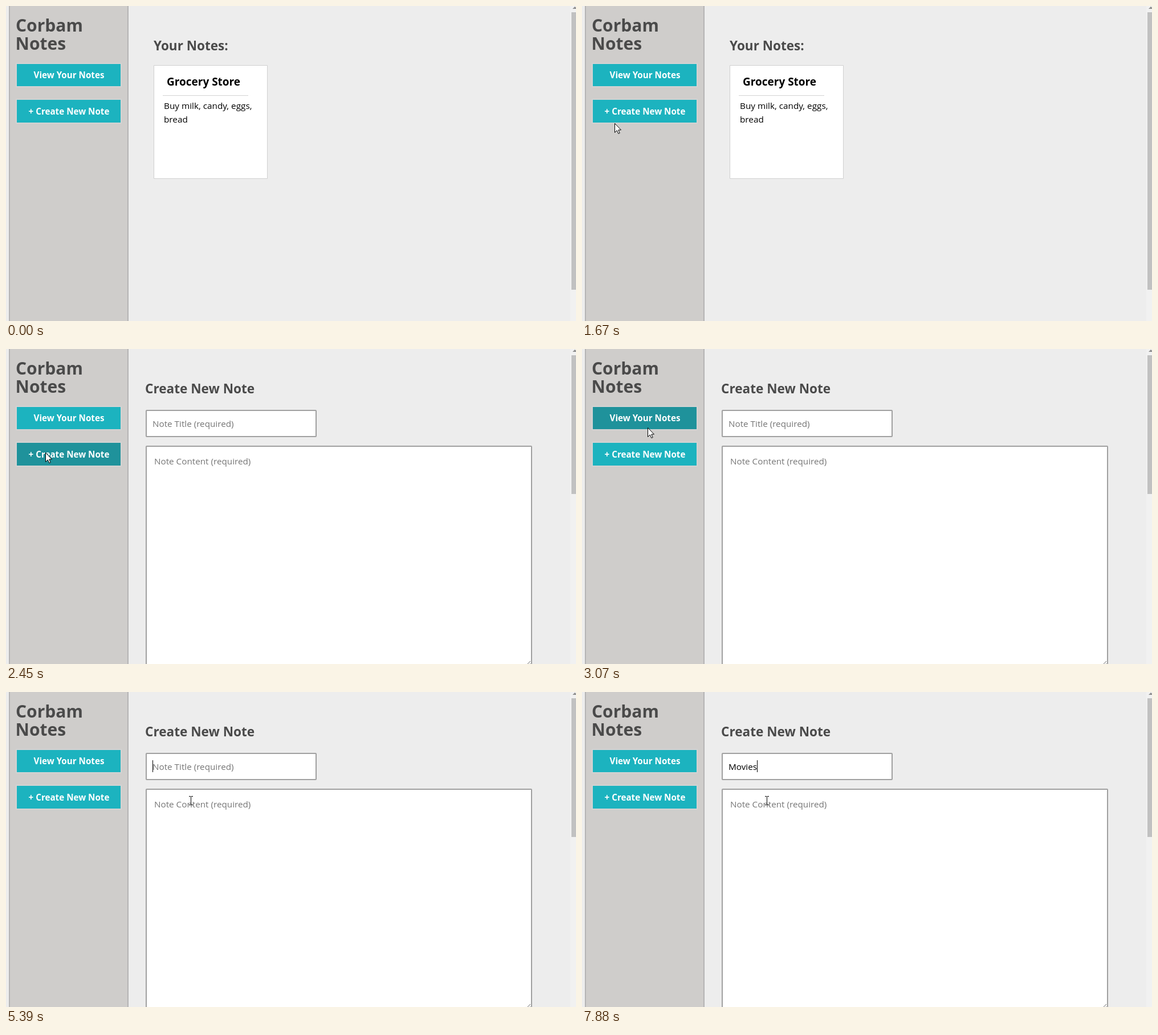
Animation, 1000 px wide and 554 px high, one loop 8000 ms. Source, as an HTML page with a canvas:

```html
<!DOCTYPE html>
<html lang="en">
<head>
<meta charset="utf-8">
<title>Notes app</title>
<style>
  html, body { margin: 0; width: 100%; height: 100%; overflow: hidden; background: #ededed; }
  canvas { display: block; }
</style>
</head>
<body>
<canvas id="stage" width="1000" height="554"></canvas>
<script>
const ctx = document.getElementById('stage').getContext('2d');
const LOOP = 8000;
const TEAL = '#1cb3bf', TEAL_DARK = '#1f929b', INK = '#4a4a4a', HINT = '#757575';

// [start ms, x, y] of the pointer
const POINTER = [
  [580, 755, 540], [735, 591, 475], [890, 444, 416], [1045, 314, 364],
  [1200, 202, 319], [1355, 119, 286], [1510, 72, 267],
  [1670, 57, 206], [1815, 63, 191], [1960, 69, 182],
  [2910, 82, 168], [3065, 115, 138], [3220, 174, 122], [3375, 238, 117], [3530, 300, 120],
  [4480, 314, 158], [4630, 322, 190]
];
const TYPING = [[6970, 'M'], [7110, 'Mo'], [7250, 'Mov'], [7580, 'Movie'], [7880, 'Movies']];
const CLICKS = [[2300, 2450], [3850, 4020]];
const CARET = [[3850, 4480], [5390, 5860], [6480, LOOP]];

const latest = (list, t) => list.filter(item => item[0] <= t).pop();
const during = (spans, t) => spans.some(([from, to]) => t >= from && t < to);

function rect(x, y, w, h, color) {
  ctx.fillStyle = color;
  ctx.fillRect(x, y, w, h);
}

function text(str, x, y, size, color, weight = 400, align = 'left') {
  ctx.font = `${weight} ${size}px "Open Sans", "Noto Sans", sans-serif`;
  ctx.textAlign = align;
  ctx.fillStyle = color;
  ctx.fillText(str, x, y);
}

function box(x, y, w, h, line, color, radius = 0, fill = '#fff') {
  ctx.beginPath();
  ctx.roundRect(x + line / 2, y + line / 2, w - line, h - line, radius);
  if (fill) {
    ctx.fillStyle = fill;
    ctx.fill();
  }
  ctx.lineWidth = line;
  ctx.strokeStyle = color;
  ctx.stroke();
}

function button(label, y, h, pointer) {
  const hover = pointer && pointer[1] >= 17 && pointer[1] < 203
    && pointer[2] >= y && pointer[2] < y + h - 2;
  rect(17, y, 186, h, '#d3d3d3');
  rect(19, y + 2, 182, h - 4, hover ? TEAL_DARK : TEAL);
  text(label, 110.5, y + h - 16, 15.2, '#fff', 700, 'center');
}

function sidebar(t, pointer) {
  rect(5, 0, 210, 554, '#b5b4b4');
  rect(7, 0, 206, 554, '#cfcdcb');
  text('Corbam', 17, 45, 30, INK, 700);
  text('Notes', 16.5, 77, 30, INK, 700);
  button('View Your Notes', 100, 43, pointer);
  button('+ Create New Note', 163, 44, pointer);
  if (t >= 2300 && t < 2450) box(16, 162, 188, 46, 1.5, '#85a9e6', 1, null);
}

function scrollbar(thumbHeight) {
  rect(990, 0, 10, 554, '#f1f1f1');
  rect(992, 11, 8, thumbHeight, '#c1c1c1');
  ctx.fillStyle = '#8b8b8b';
  ctx.fill(new Path2D('M994 5 L998 1 L1000 3 V5 Z'));
}

function notesPage() {
  text('Your Notes:', 259, 78, 22.5, INK, 700);
  box(259, 104, 200, 200, 1, '#d0d0d0');
  text('Grocery Store', 282, 140, 19, '#000', 700);
  rect(275, 157, 150, 1, '#d3d3d3');
  text('Buy milk, candy, eggs,', 277, 181, 15.3, '#000');
  text('bread', 277, 205, 15.3, '#000');
  scrollbar(488);
}

function formPage(t) {
  const typed = latest(TYPING, t)?.[1] ?? '';
  text('Create New Note', 244, 78, 22.6, INK, 700);
  box(245, 107, 300, 48, 2, '#a0a0a0', 1);
  text(typed || 'Note Title (required)', 257, 137, 15.25, typed ? '#000' : HINT);
  const caretX = 257 + (typed ? Math.round(ctx.measureText(typed).width) : 0);
  if (during(CARET, t)) rect(caretX, 120, 1, 21, '#000');
  box(245, 170, 678, 400, 2, '#a0a0a0', 1);
  text('Note Content (required)', 260, 203, 15.25, HINT);
  ctx.lineWidth = 1;
  ctx.strokeStyle = '#666';
  ctx.stroke(new Path2D('M914 555 L920 549 M918 555 L920 553'));
  scrollbar(244);
}

function drawPointer(t, [, x, y]) {
  ctx.save();
  ctx.translate(x, y);
  ctx.lineWidth = 1;
  ctx.strokeStyle = '#000';
  if (t < 3530) {
    const arrow = new Path2D('M.5 .5 V16.5 L4.3 12.9 L6.8 18.5 L9.2 17.5 L6.8 12 H11.5 Z');
    ctx.fillStyle = '#fff';
    ctx.fill(arrow);
    ctx.stroke(arrow);
  } else {
    ctx.stroke(new Path2D('M2.5 -6 V8 M-1 -6.5 H2 M3 -6.5 H6 M-1 8.5 H2 M3 8.5 H6'));
  }
  if (during(CLICKS, t)) {
    ctx.beginPath();
    ctx.arc(0, 0, 12, 0, Math.PI * 2);
    ctx.fillStyle = 'rgba(255, 255, 0, .5)';
    ctx.fill();
  }
  ctx.restore();
}

function draw(now) {
  const t = now % LOOP;
  const pointer = latest(POINTER, t);
  rect(0, 0, 1000, 554, '#ededed');
  sidebar(t, pointer);
  if (t < 2450) notesPage();
  else formPage(t);
  if (pointer) drawPointer(t, pointer);
  requestAnimationFrame(draw);
}
requestAnimationFrame(draw);
</script>
</body>
</html>
```
